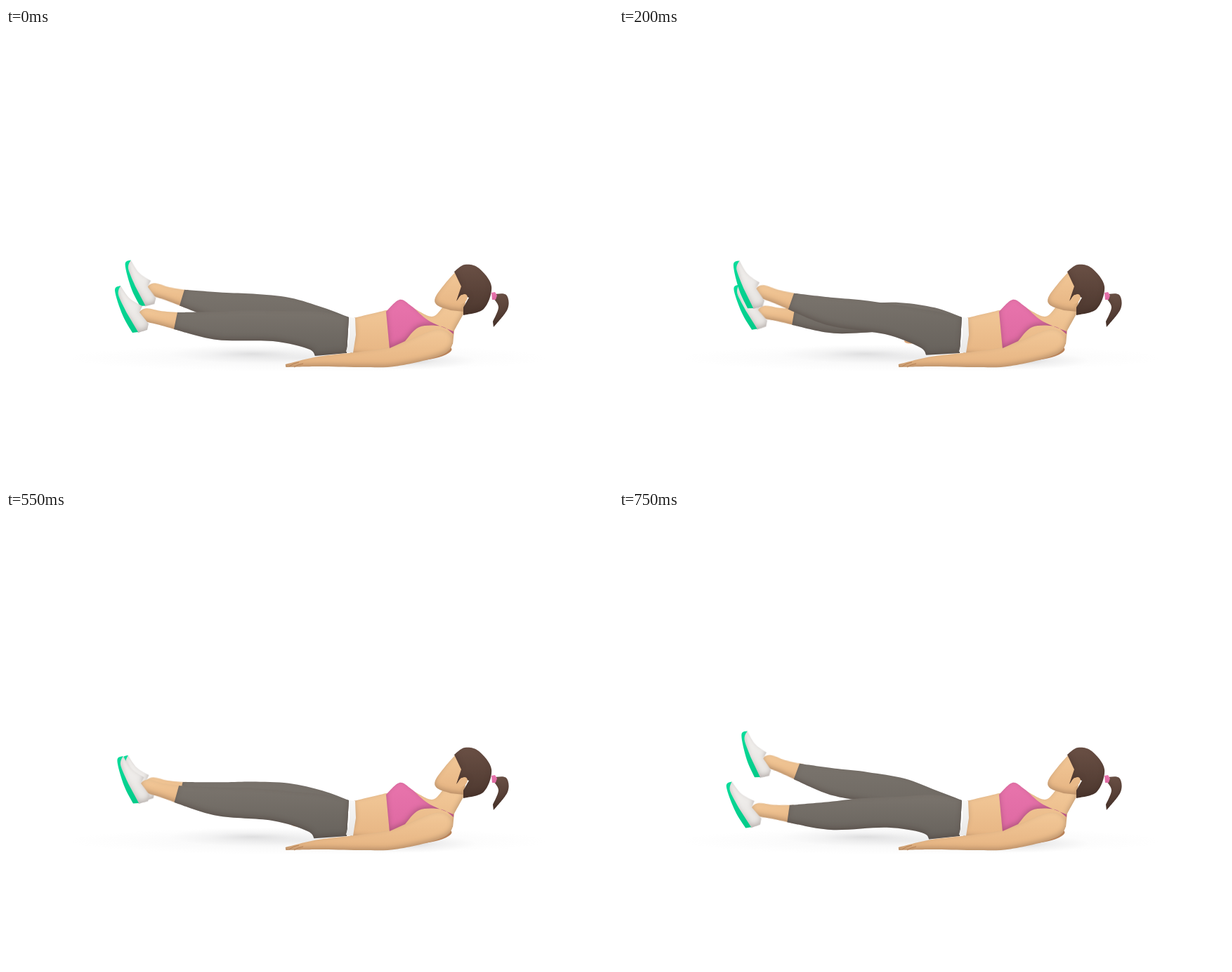
These frames come from a looping animation (864x648 px, 0.9 s). An HTML page:

```html
<!DOCTYPE html>
<html lang="en">
<head>
<meta charset="utf-8">
<title>Flutter kicks</title>
<style>
  html, body { margin: 0; width: 100%; height: 100%; overflow: hidden; background: #fff; }
  svg { display: block; width: 100vw; height: 100vh; }
</style>
</head>
<body>
<svg id="stage" viewBox="0 0 864 648">
  <defs>
    <filter id="round" x="-5%" y="-5%" width="110%" height="110%" color-interpolation-filters="sRGB">
      <feGaussianBlur in="SourceAlpha" stdDeviation="3.5"/>
      <feOffset dy="-3" result="core"/>
      <feFlood flood-color="#2a1712" flood-opacity=".25"/>
      <feComposite in2="core" operator="out"/>
      <feComposite in2="SourceAlpha" operator="in" result="rim"/>
      <feMerge><feMergeNode in="SourceGraphic"/><feMergeNode in="rim"/></feMerge>
    </filter>
    <radialGradient id="shade">
      <stop offset="0" stop-color="#8b8b8e" stop-opacity=".42"/>
      <stop offset=".5" stop-color="#9b9b9e" stop-opacity=".14"/>
      <stop offset="1" stop-color="#aaa" stop-opacity="0"/>
    </radialGradient>
  </defs>
</svg>
<script>
const NS = 'http://www.w3.org/2000/svg';
const stage = document.getElementById('stage');
const defs = stage.querySelector('defs');

function add(parent, tag, attrs = {}) {
  const node = document.createElementNS(NS, tag);
  for (const key in attrs) node.setAttribute(key, attrs[key]);
  return parent.appendChild(node);
}

// Vertical two-tone fills
const tones = {
  skin: ['#f2c898', '#e6b482'],
  pants: ['#7a746d', '#67625c'],
  pink: ['#e874ac', '#de69a2'],
  hair: ['#6a5045', '#4c372e'],
  shoe: ['#f4f2f0', '#e6e3e0'],
  band: ['#f7f7f6', '#e9e8e7'],
  sole: ['#08dd9b', '#02cb89']
};
for (const name in tones) {
  const gradient = add(defs, 'linearGradient', { id: name, x2: 0, y2: 1 });
  tones[name].forEach((color, i) => add(gradient, 'stop', { offset: i, 'stop-color': color }));
}

// "x,y x,y | x,y ..." : smooth edges that meet in corners at "|"
const parse = text => text.split('|').map(edge =>
  edge.trim().split(/\s+/).map(point => point.split(',').map(Number)));

function outline(edges) {
  const parts = edges.map(p => p.map((b, i) => {
    if (!i) return b.join();
    const a = p[i - 1], before = p[i - 2] || a, after = p[i + 1] || b;
    const c1 = [0, 1].map(k => a[k] + (b[k] - before[k]) / 6);
    const c2 = [0, 1].map(k => b[k] - (after[k] - a[k]) / 6);
    return `C${c1} ${c2} ${b}`;
  }).join(' '));
  return 'M' + parts.join('L') + 'Z';
}

function paint(parent, fill, edges, soft = true) {
  const node = add(parent, 'path', { d: outline(edges), fill: `url(#${fill})` });
  if (soft) node.setAttribute('filter', 'url(#round)');
  return node;
}

const shape = (parent, fill, text, soft) => paint(parent, fill, parse(text), soft);

// A tapered tube through "x,y,radius" knots with a round far end
function tube(parent, fill, text) {
  const [knots] = parse(text);
  const left = [], right = [];
  let tip;
  knots.forEach(([x, y, r], i) => {
    const [x0, y0] = knots[i - 1] || knots[i], [x1, y1] = knots[i + 1] || knots[i];
    const length = Math.hypot(x1 - x0, y1 - y0);
    const ux = (x1 - x0) / length * r, uy = (y1 - y0) / length * r;
    left.push([x + uy, y - ux]);
    right.unshift([x - uy, y + ux]);
    tip = [x + ux, y + uy];
  });
  return paint(parent, fill, [[...left, tip, ...right]]);
}

const ellipse = (cx, cy, rx, ry, fill, attrs) =>
  add(stage, 'ellipse', { cx, cy, rx, ry, fill, ...attrs });
const shadow = (cx, cy, rx, ry, opacity) => ellipse(cx, cy, rx, ry, 'url(#shade)', { opacity });

// Both legs share one model; the far one is raised, turned and slightly smaller
const HIP = [455, 430];
const PANTS = parse(`244,405 300,404 345,402 400,403 450,404 488,412 | 485,463
  | 440,467 430,457 380,446 300,444 239,429`);

function makeLeg(lift, scale, tilt) {
  const limb = add(stage, 'g');
  tube(limb, 'skin', '248,418,13 220,413,10 198,408,9');
  const foot = add(limb, 'g');
  shape(foot, 'shoe', '163,367 176,385 194,396 | 190,405 203,421 | 201,430 188,434 | 168,405 158,374');
  shape(foot, 'sole', '163,367 155,374 166,409 180,434 | 188,433 | 172,406 160,380 163,367', false);
  const cloth = paint(stage, 'pants', PANTS);

  return swing => {
    const degrees = tilt + swing, angle = degrees * Math.PI / 180;
    const c = scale * Math.cos(angle), s = scale * Math.sin(angle);
    // The waist stays put; the leg blends into the full turn towards the knee
    const bend = ([x, y]) => {
      const t = Math.min(1, Math.max(0, (485 - x) / 80)), weight = t * t * (3 - 2 * t);
      const dx = x - HIP[0], dy = y - HIP[1];
      const turned = [HIP[0] + dx * c - dy * s, HIP[1] - lift + dx * s + dy * c];
      return [x + (turned[0] - x) * weight, y + (turned[1] - y) * weight];
    };
    cloth.setAttribute('d', outline(PANTS.map(edge => edge.map(bend))));
    limb.setAttribute('transform', `translate(${HIP[0]} ${HIP[1] - lift}) rotate(${degrees})
      scale(${scale}) translate(${-HIP[0]} ${-HIP[1]})`);
    foot.setAttribute('transform', `rotate(${-0.4 * degrees} 200 408)`);
  };
}

// Ground
shadow(430, 470, 345, 20, .35);
shadow(350, 464, 120, 13, .55);
shadow(560, 474, 110, 13, .9);

// Far hand, far leg and the back of the shoulder
ellipse(415, 446, 9, 3.5, '#dca779');
const poseFarLeg = makeLeg(15, .967, 5.1);
ellipse(602, 463, 33, 9, '#b98258', { transform: 'rotate(-10 602 463)' });

// Torso, face and near leg
shape(stage, 'skin', `495,413 541,402 | 577,397 606,411 622,397 | 654,402 638,431
  | 636,450 545,470 | 490,464 497,440 495,413`);
shape(stage, 'skin', '641,346 625,364 611,384 614,395 633,402 | 652,404 656,360 641,346');
const poseNearLeg = makeLeg(0, 1, 0);
shape(stage, 'band', '488,412 497,413 | 498,437 494,463 | 484,461 489,438 488,412', false);

// Arm, fingers and top
tube(stage, 'skin', '398,481,2 445,475,7 505,472,11 555,467,14.5 618,447,18');
add(stage, 'path', {
  d: 'M403 482Q409 477 417 476M410 483Q416 479 423 478',
  fill: 'none', stroke: '#b57f54', 'stroke-width': 1
});
shape(stage, 'pink', `541,404 546,456 | 568,446 588,426 620,425 637,436
  | 637,432 602,417 577,396 560,387 541,404`);

// Ponytail, hair and ear
shape(stage, 'hair', '694,379 712,380 714,400 694,426 | 693,418 701,398 694,385');
shape(stage, 'pink', '691,377 696,376 | 699,381 697,387 | 692,387', false);
shape(stage, 'hair', `638,347 653,337 673,342 691,368 680,400 651,409 | 651,398 659,384
  | 648,380 641,389 | 648,368 638,347`);
ellipse(650, 386, 8, 5.5, '#e9b988', { transform: 'rotate(-45 650 386)' });

// Four held poses each way, then a turn: 100 ms each, the last one 150 ms
function draw() {
  const time = performance.now() % 900;
  const step = Math.min(3, Math.floor(time % 450 / 100));
  const swing = 3.75 * (time < 450 ? step : 2 - step);
  poseNearLeg(swing);
  poseFarLeg(-swing);
  requestAnimationFrame(draw);
}
draw();
</script>
</body>
</html>
```
